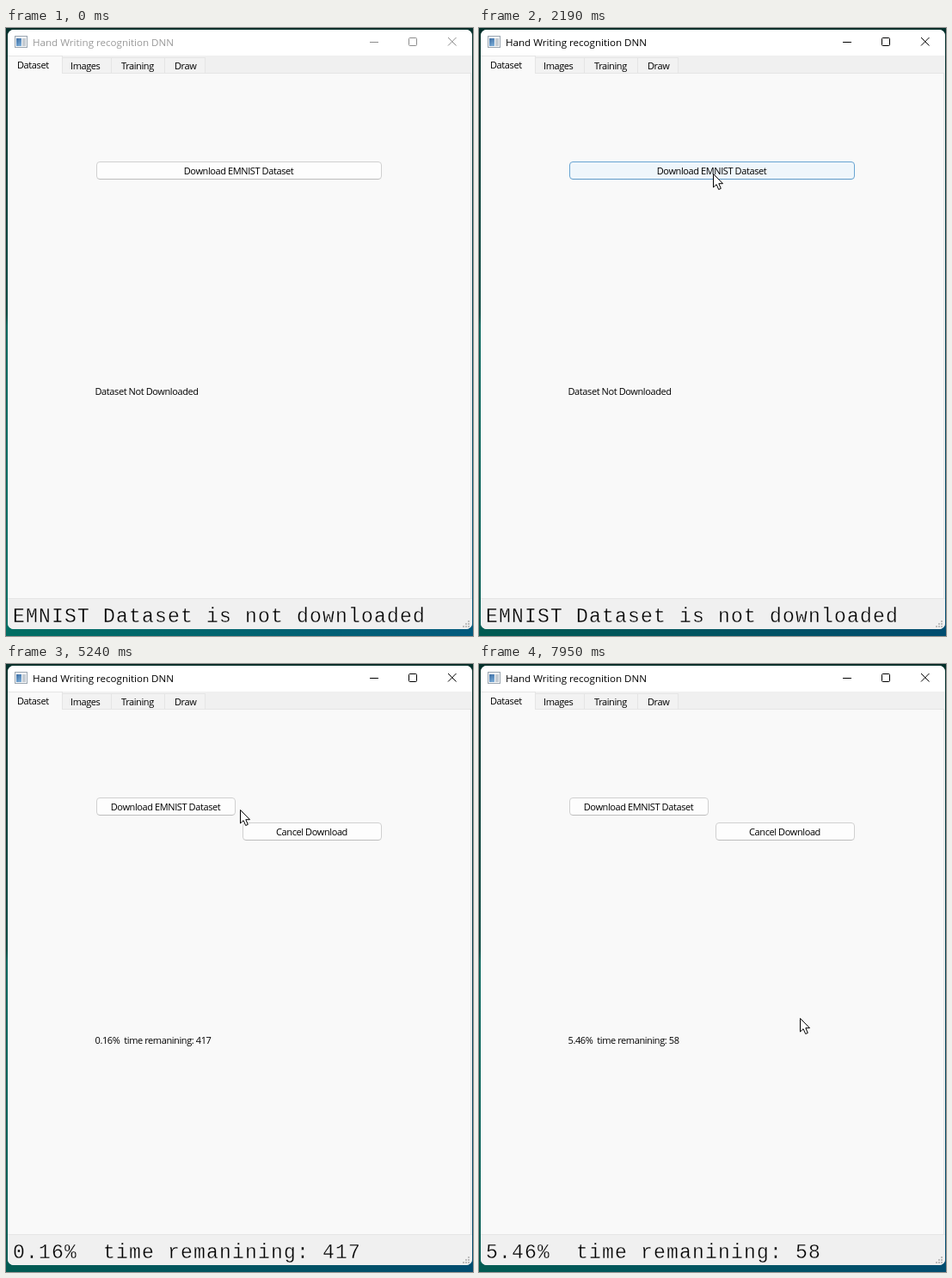
Animation, 543 px wide and 706 px high, one loop 8 s. Source, as an HTML page with a canvas:

```html
<!DOCTYPE html>
<html lang="en">
<head>
<meta charset="utf-8">
<title>Hand Writing recognition DNN</title>
<style>
html, body { margin: 0; width: 100%; height: 100%; overflow: hidden; background: #f9f9f9; }
canvas { display: block; width: 543px; height: 706px; }
</style>
</head>
<body>
<canvas id="stage" width="543" height="706"></canvas>
<script>
const ctx = document.getElementById('stage').getContext('2d');
const UI = '500 11px "Open Sans", "Noto Sans", sans-serif';
const TITLE = '11.6px "Open Sans", "Noto Sans", sans-serif';
const MONO = '23px "Liberation Mono", "Courier New", monospace';
const SPACING = { [UI]: '-0.4px', [TITLE]: '0px', [MONO]: '1.2px' };

const LOOP = 8000;
const APPEAR = 330, ACTIVATE = 1590, NUDGE = 2190, SPLIT = 3790, REPORT = 4250, LEAVE = 7270;

const ramp = (t, a, b) => Math.min(1, Math.max(0, (t - a) / (b - a)));
const smooth = k => k * k * (3 - 2 * k);

// Pointer: sweep up past the button, settle on its edge, later drift away
function pointerAt(t) {
  let x = 338, y = 577;
  const moveTo = (toX, toY, start, end) => {
    const k = smooth(ramp(t, start, end));
    x += (toX - x) * k;
    y += (toY - y) * k;
  };
  moveTo(283, 148, APPEAR - 100, 960);
  moveTo(278, 175, 960, 1180);
  moveTo(276, 165, 1400, ACTIVATE);
  moveTo(272, 169, NUDGE - 1, NUDGE);
  moveTo(373, 411, LEAVE, 7940);
  return [Math.round(x), Math.round(y)];
}

// Button highlight, 0 to 1
function heatAt(t) {
  if (t >= SPLIT) return 0.8 * (1 - ramp(t, SPLIT + 60, SPLIT + 200));
  return 0.9 * ramp(t, 840, 1040) - 0.75 * ramp(t, 1180, 1320) + 0.35 * ramp(t, ACTIVATE, 1790);
}

// Two reports per 990 ms; the share follows a logistic curve
function reportAt(t) {
  if (t < REPORT) return null;
  const since = t - REPORT;
  const tick = 2 * Math.floor(since / 990) + (since % 990 >= 530 ? 1 : 0);
  const n = tick - 2;
  const percent = 5.886 / (1 + Math.exp(3.5776 - 1.22565 * n));
  const elapsed = Math.exp(-0.4035 + 0.081 * n + 0.0483 * n * n);
  const left = Math.round(elapsed * (100 / percent - 1));
  return `${percent.toFixed(2)}%  time remanining: ${left}`;
}

function mix(a, b, k) {
  return 'rgb(' + a.map((v, i) => Math.round(v + (b[i] - v) * k)).join(',') + ')';
}

function rect(x, y, w, h, color) {
  ctx.fillStyle = color;
  ctx.fillRect(x, y, w, h);
}

function rounded(x, y, w, h, r) {
  ctx.beginPath();
  ctx.roundRect(x, y, w, h, r);
}

function line(x0, y0, x1, y1) {
  ctx.beginPath();
  ctx.moveTo(x0, y0);
  ctx.lineTo(x1, y1);
  ctx.stroke();
}

function blend(x0, y0, x1, y1, ...stops) {
  const g = ctx.createLinearGradient(x0, y0, x1, y1);
  stops.forEach(([at, color]) => g.addColorStop(at, color));
  return g;
}

function text(str, x, y, font = UI, color = '#000', align = 'left') {
  ctx.font = font;
  ctx.letterSpacing = SPACING[font];
  ctx.textAlign = align;
  ctx.fillStyle = color;
  ctx.fillText(str, x, y);
}

function desktop(active) {
  const [left, right] = active ? ['#015b52', '#014d70'] : ['#016e63', '#025a7d'];
  rect(0, 0, 543, 706, blend(0, 0, 0, 706,
    [0, '#04302b'], [0.47, '#084a42'], [0.49, '#05665c'], [1, left]));
  rect(0, 690, 543, 16, blend(0, 0, 543, 0, [0, left], [1, right]));
  rect(541, 0, 2, 690, blend(0, 0, 0, 690, [0, '#04302b'], [1, right]));
}

function appIcon() {
  rect(10, 9, 15, 14, '#9aa5b0');
  rect(11, 10, 13, 12, '#f4f6f8');
  rect(12, 12, 6, 9, blend(12, 12, 18, 21, [0, '#3c6ea5'], [1, '#7fb0da']));
  rect(19, 12, 4, 9, '#c5ccd3');
}

function titleBar(active) {
  rect(2, 2, 540, 30, '#fff');
  appIcon();
  text('Hand Writing recognition DNN', 31, 21, TITLE, active ? '#000' : '#999');
  ctx.strokeStyle = active ? '#000' : '#8c8c8c';
  ctx.lineWidth = 1;
  line(423, 16.5, 433, 16.5);
  line(514, 11, 523.5, 20.5);
  line(523.5, 11, 514, 20.5);
  rounded(468.5, 11.5, 9, 9, 1);
  ctx.stroke();
}

function tab(x0, x1, label, x) {
  rect(x0, 34, x1 - x0, 19, '#e5e5e5');
  rect(x0, 35, x1 - x0 - 1, 18, '#f2f2f2');
  text(label, x, 48);
}

function tabs() {
  rect(2, 32, 540, 21, '#f0f0f0');
  tab(66, 123, 'Images', 75);
  tab(123, 185, 'Training', 134);
  tab(185, 232, 'Draw', 196);
  rect(2, 52, 539, 1, '#e5e5e5');
  rect(2, 32, 64, 21, '#e5e5e5');
  rect(2, 33, 63, 20, '#f9f9f9');
  text('Dataset', 13, 47);
}

function button(x, y, w, label, heat = 0) {
  const edge = gray => mix([gray, gray, gray], [0, 120, 212], heat);
  rounded(x + 0.5, y + 0.5, w - 1, 20, 3.5);
  ctx.fillStyle = mix([253, 253, 253], [224, 238, 249], heat);
  ctx.fill();
  ctx.strokeStyle = blend(0, y, 0, y + 21, [0.88, edge(208)], [1, edge(184)]);
  ctx.lineWidth = 1;
  ctx.stroke();
  text(label, x + w / 2 - 0.5, y + 15, UI, '#000', 'center');
}

function statusBar(message) {
  rect(2, 662, 540, 37, '#f0f0f0');
  rect(2, 662, 540, 1, '#e6e6e6');
  text(message, 8, 690, MONO);
  // Trim the outline for a lighter stroke
  ctx.strokeStyle = '#f0f0f0';
  ctx.lineWidth = 0.4;
  ctx.strokeText(message, 8, 690);
  for (let row = 0; row < 3; row++) {
    for (let col = 2 - row; col < 3; col++) {
      rect(531 + col * 3, 688 + row * 3, 2, 2, '#bdbdbd');
    }
  }
}

function cursor(x, y) {
  ctx.save();
  ctx.translate(x + 0.5, y + 0.5);
  ctx.beginPath();
  [[0, 0], [0, 15.5], [3.6, 12.2], [6.2, 18], [8.8, 16.9], [6.3, 11.2], [11, 11.2]]
    .forEach(([px, py]) => ctx.lineTo(px, py));
  ctx.closePath();
  ctx.fillStyle = '#fff';
  ctx.fill();
  ctx.strokeStyle = '#000';
  ctx.lineWidth = 1;
  ctx.stroke();
  ctx.restore();
}

function draw(t) {
  const active = t >= ACTIVATE;
  const split = t >= SPLIT;
  const report = reportAt(t);

  desktop(active);
  ctx.save();
  rounded(2, 2, 540, 696, 7);
  ctx.clip();
  rect(2, 2, 540, 696, '#f9f9f9');
  titleBar(active);
  tabs();
  rect(540, 53, 1, 609, '#e5e5e5');
  rect(541, 53, 1, 609, '#f0f0f0');
  button(105, 155, split ? 162 : 332, 'Download EMNIST Dataset', heatAt(t));
  if (split) button(275, 184, 162, 'Cancel Download');
  text(report || 'Dataset Not Downloaded', 103.5, split ? 441 : 426);
  statusBar(report || 'EMNIST Dataset is not downloaded');
  ctx.restore();

  if (t >= APPEAR) cursor(...pointerAt(t));
}

function frame(now) {
  draw(now % LOOP);
  requestAnimationFrame(frame);
}
requestAnimationFrame(frame);
</script>
</body>
</html>
```
